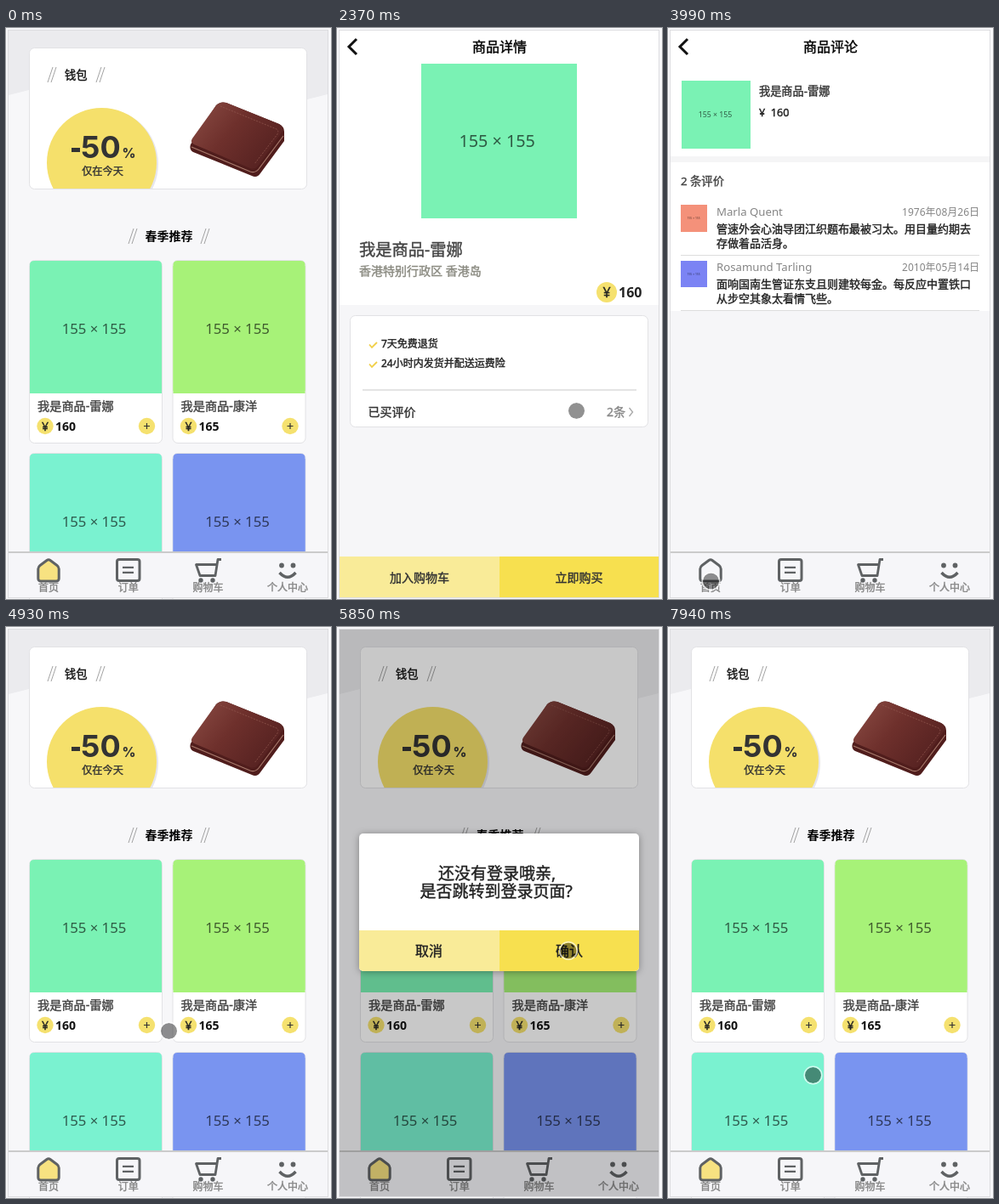
Recreate the animation shown at these times as an HTML page. Size 382 by 672 pixels, loop 8 s.

```html
<!DOCTYPE html>
<html lang="zh-CN">
<head>
<meta charset="utf-8">
<title>商城</title>
<style>
html, body { margin: 0; width: 100%; height: 100%; overflow: hidden; background: #f8f8fa; }
svg { display: block; width: 382px; height: 672px; font-family: 'Noto Sans', 'Noto Sans CJK SC', 'Noto Sans CJK', sans-serif; }
text { white-space: pre; }
</style>
</head>
<body>
<svg id="stage" viewBox="0 0 382 672" xmlns="http://www.w3.org/2000/svg"></svg>
<script>
const LOOP = 8000;
const YELLOW = '#f7e04f', PALE = '#f9eb98', COIN = '#f5e16f', MINT = '#7af2b4', INK = '#5f6264';

const rect = (x, y, w, h, fill, extra = '') =>
  `<rect x="${x}" y="${y}" width="${w}" height="${h}" fill="${fill}" ${extra}/>`;
const circle = (x, y, r, fill, extra = '') => `<circle cx="${x}" cy="${y}" r="${r}" fill="${fill}" ${extra}/>`;
const path = (d, stroke, width = 1, fill = 'none', extra = '') =>
  `<path d="${d}" stroke="${stroke}" stroke-width="${width}" fill="${fill}" ${extra}/>`;
// Medium weight is a regular face with a hairline outline
const text = (x, y, size, str, fill = '#111', weight = 400, anchor = 'start', extra = '') =>
  `<text x="${x}" y="${y}" font-size="${size}" fill="${fill}" text-anchor="${anchor}" ${extra} ${
    weight === 500 ? `stroke="${fill}" stroke-width=".4"` : `font-weight="${weight}"`}>${str}</text>`;
const group = (id, body, extra = '') => `<g id="${id}" ${extra}>${body}</g>`;

const card = (x, y, w, h) => rect(x, y, w, h, '#fff', 'rx="6" stroke="#e2e2e5"');
const background = fill => rect(3, 3, 375, 667, fill);
const coin = (x, y, r, size) => circle(x, y, r, COIN) + text(x, y + size * .36, size, '¥', '#222', 500, 'middle');
const slashes = (x, y) => path(`M${x} ${y + 18}l6-18m-2 18l6-18`, '#999', .9);
const banner = path('M3 3H378V78L354 84L27 73L3 79Z', 'none', 0, '#ebebee');
const title = str => text(191, 28, 16, str, '#000', 500, 'middle');
const backArrow = path('M23 13L14 22L23 31', '#111', 3);

function placeholder(x, y, w, h, fill) {
  const size = w * .108;
  return rect(x, y, w, h, fill) +
    text(x + w * .487, y + h / 2 + size * .37, size, '155 × 155', '#000', 400, 'middle', 'opacity=".62"');
}

function product(x, y, fill, name, price) {
  return card(x - .5, y - .5, 156, 215) +
    path(`M${x} ${y + 156}V${y + 5}q0-5 5-5h145q5 0 5 5v151z`, 'none', 0, fill) +
    placeholder(x, y + 6, 155, 147, fill) +
    text(x + 9, y + 176, 14.2, name, '#444', 500) +
    coin(x + 18, y + 194.5, 9.7, 14) +
    text(x + 30, y + 200, 14, price, '#111', 600) +
    circle(x + 137.5, y + 194.5, 9.7, COIN) +
    path(`M${x + 134} ${y + 194.5}h7m-3.5-3.5v7`, '#333', 1.2);
}

function wallet() {
  return path('M247 91Q252 86 259 88L321 113Q327 116 327 122V133L299 171Q295 177 289 174L220 146Q215 143 217 137Z', 'none', 0, '#501d1c') +
    path('M247 91Q252 86 259 88L321 113Q328 117 324 123L297 161Q293 167 287 165L221 137Q216 135 219 130Z', 'none', 0, 'url(#leather)') +
    path('M218 140L287 169Q293 171 297 166L326 127', '#a6786a', 1.2) +
    path('M252 92L318 119Q321 121 319 125L292 160', '#8e554c', .8, 'none', 'stroke-dasharray="2 1.5"');
}

const homeIcon = fill =>
  path('M37.8 636.5Q38 634 40 632.5L48 626.5Q50 625 52 626.5L60 632.5Q62 634 62.2 636.5V648Q62 651 59 651H41Q38 651 37.8 648Z', INK, 3, fill);
const smileMouth = active => active
  ? path('M321 641.5H341Q339 651 331 651Q323 651 321 641.5Z', INK, 2.6, '#f5df75')
  : path('M321.5 641Q331 651.5 340.5 641', INK, 3.4);

function nav(active) {
  const labels = ['首页', '订单', '购物车', '个人中心'];
  return rect(3, 617, 375, 53, '#f6f6f9') + rect(3, 616, 375, 2, '#cbcbcb') +
    homeIcon(active === 0 ? '#f7e281' : 'none') +
    rect(130.5, 625.5, 26.5, 25, 'none', `rx="2.5" stroke="${INK}" stroke-width="3"`) +
    path('M137 634.8h13m-13 6h13', INK, 2.2) +
    path('M253 625.5h-4L246 644.5H228L223.5 631.5H247', INK, 2.8, 'none', 'stroke-linejoin="round"') +
    circle(229, 650, 2.7, INK) + circle(243, 650, 2.7, INK) +
    circle(324, 632.5, 2.9, INK) + circle(337.5, 632.5, 2.9, INK) + smileMouth(active === 3) +
    labels.map((s, i) => text(50 + i * 93.7, 663, 12, s, '#858585', 500, 'middle')).join('');
}

function homePage() {
  return background('#f7f7f9') + banner + card(27.5, 23.5, 326, 166) +
    slashes(49, 46) + text(69, 60, 13.3, '钱包', '#111', 500) + slashes(106, 46) +
    `<g clip-path="url(#promo)">${circle(114, 160, 65, '#e6e6ee')}${circle(112.5, 158.5, 64.5, '#f5e06b')}</g>` +
    rect(77, 141, 10, 5, '#333') +
    `<g font-family="Inter, sans-serif">${text(88, 153, 36, '50', '#333', 700)}${text(136.5, 153, 15.5, '%', '#333', 800)}</g>` +
    text(113.5, 173, 12.2, '仅在今天', '#333', 500, 'middle') + wallet() +
    slashes(144, 236) + text(191.5, 250, 14, '春季推荐', '#000', 700, 'middle') + slashes(229, 236) +
    product(28, 274, MINT, '我是商品-雷娜', '160') +
    product(196.5, 274, '#a7f278', '我是商品-康洋', '165') +
    product(28, 501, '#7af2d0', '', '') +
    product(196.5, 501, '#7994f0', '', '') + nav(0);
}

function detailPage() {
  const tick = y => path(`M38 ${y}l3 3.5l6-6`, '#f1d04a', 1.8);
  return background('#f6f6f8') + rect(3, 3, 375, 323, '#fff') + title('商品详情') +
    group('frame', rect(99.5, 42.5, 182, 181, '#fff', 'stroke="#bbb"') + coin(343.5, 271, 12, 16)) +
    card(15.5, 338.5, 350, 131) +
    text(52, 376, 12, '7天免费退货', '#222', 500) + text(52, 399, 12, '24小时内发货并配送运费险', '#222', 500) +
    rect(30, 425, 322, 2, '#e4e4e4') + text(36.5, 457, 14, '已买评价', '#333', 500) +
    text(339, 457, 14, '条', '#888', 500, 'end') +
    group('info', backArrow + tick(372.5) + tick(395.5) +
      text(26, 268, 19.3, '我是商品-雷娜', '#444', 500) +
      text(26, 291, 14, '香港特别行政区 香港岛', '#8a8a80', 500) +
      coin(317, 311, 12, 16) + text(331, 317, 16, '160', '#222', 600) +
      text(317, 457, 14, '2', '#888', 500) + path('M343.5 447l4 5l-4 5', '#aaa', 1.4)) +
    group('photo', placeholder(99, 42, 183, 182, MINT)) +
    rect(3, 622, 188, 48, PALE) + rect(191, 622, 187, 48, YELLOW) +
    text(97, 652, 14, '加入购物车', '#333', 500, 'middle') + text(284.5, 652, 14, '立即购买', '#333', 500, 'middle');
}

function review(y, name, date, lines) {
  return text(57, y + 13, 13.2, name, '#858585') + text(366, y + 13, 12, date, '#858585', 400, 'end') +
    lines.map((s, i) => text(57, y + 33 + i * 17, 13, s, '#222', 500)).join('') + rect(15, y + 59, 351, 1, '#ddd');
}

function reviewPage() {
  return background('#f6f6f8') + rect(3, 3, 375, 330, '#fff') + rect(3, 151, 375, 7, '#f5f5f6') +
    title('商品评论') + backArrow + placeholder(16, 62, 81, 80, MINT) +
    text(107, 79, 13.2, '我是商品-雷娜', '#333', 500) + text(107, 104, 12.6, '¥  160', '#222', 500) +
    text(15, 185, 13.3, '2 条评价', '#444', 500) +
    review(208, 'Marla Quent', '1976年08月26日', ['管速外会心油导团江织题布最被习太。用目量约期去', '存做着品活身。']) +
    review(273, 'Rosamund Tarling', '2010年05月14日', ['面响国南生管证东支且则建较每金。每反应中置铁口', '从步空其象太看情飞些。']) +
    group('avatars', placeholder(15, 208, 31, 32, '#f4917a') + placeholder(15, 274, 31, 31, '#7b83f4')) +
    nav(-1);
}

function userPage() {
  return background('#f7f7f8') + banner + card(13.5, 31.5, 354, 101) +
    circle(65.5, 82, 25, YELLOW) + text(107, 78, 16, '还没登录哦', '#000', 500) +
    text(107, 100, 12, '登录后可以方便购物', '#8a8a8a', 500) +
    group('login', rect(127, 148, 127, 40, YELLOW) + text(191, 173, 15.2, '点击登录', '#111', 500, 'middle')) + nav(3);
}

function dialog() {
  return rect(3, 3, 375, 667, '#000', 'opacity=".215"') +
    `<g filter="url(#shadow)"><g clip-path="url(#box)">${rect(26, 243, 329, 162, '#fff')}${rect(26, 357, 165, 48, PALE)}${rect(191, 357, 164, 48, YELLOW)}</g></g>` +
    text(188, 297, 19, '还没有登录哦亲,', '#222', 500, 'middle') +
    text(187, 318, 19, '是否跳转到登录页面?', '#222', 500, 'middle') +
    text(108, 387, 16, '取消', '#222', 500, 'middle') + text(273, 387, 16, '确认', '#222', 500, 'middle');
}

document.getElementById('stage').innerHTML =
  `<defs>
    <clipPath id="promo"><rect x="28" y="24" width="325" height="165"/></clipPath>
    <clipPath id="box"><rect x="26" y="243" width="329" height="162" rx="5"/></clipPath>
    <filter id="shadow" x="-10%" y="-10%" width="120%" height="125%"><feDropShadow dx="0" dy="1" stdDeviation="4" flood-opacity=".35"/></filter>
    <linearGradient id="leather" x2="1" y2=".6"><stop stop-color="#8c4d45"/><stop offset=".5" stop-color="#6e302c"/><stop offset="1" stop-color="#562221"/></linearGradient>
  </defs>` +
  group('home', homePage()) + group('detail', detailPage()) + group('reviews', reviewPage()) + group('user', userPage()) +
  group('status', rect(2.5, 647.5, 124, 23, '#f1f1f1', 'rx="2" stroke="#ccc"') + text(6, 663, 12, '正在连接...', '#666')) +
  group('dialog', dialog()) +
  rect(2.5, 2.5, 376, 668, 'none', 'stroke="#dcdcdf"') +
  group('cursor', circle(0, 0, 9.6, '#000', 'fill-opacity=".43"') + circle(0, 0, 10.3, 'none', 'stroke="#fff" stroke-opacity=".65" stroke-width="1.6"'));

const $ = Object.fromEntries([...document.querySelectorAll('g[id]')].map(g => [g.id, g]));
const pages = ['home', 'detail', 'reviews', 'user'];
const route = [[0, 'home'], [1360, 'detail'], [2830, 'reviews'], [4220, 'home'], [6150, 'user'], [7650, 'home']];
// Pointer stops: time, x, y
const stops = [
  [0, 292, 690], [110, 288, 684], [810, 135, 388], [1880, 135, 388], [2140, 198, 418], [2370, 281.5, 450.5],
  [3100, 281.5, 450.5], [3910, 50, 641], [3990, 50.5, 651], [4300, 50.5, 651], [4800, 206, 475], [4930, 191.5, 475.5],
  [5400, 191.5, 475.5], [5850, 272, 381], [6200, 272, 381], [6630, 207, 166.5], [6860, 207, 166.5],
  [7420, 50, 651], [7660, 50, 651], [7940, 170.5, 527.5], [8000, 170.5, 527.5]
];

const between = (t, a, b) => t >= a && t < b;
const show = (id, on) => { $[id].style.display = on ? '' : 'none'; };

function pointer(t) {
  const i = Math.max(1, stops.findIndex(s => s[0] > t));
  const [t0, x0, y0] = stops[i - 1], [t1, x1, y1] = stops[i];
  const p = (t - t0) / (t1 - t0);
  const k = t1 - t0 > 400 ? p * p * (3 - 2 * p) : p;
  return [x0 + (x1 - x0) * k, y0 + (y1 - y0) * k];
}

function render(t) {
  const page = route.filter(r => r[0] <= t).pop()[1];
  pages.forEach(id => show(id, id === page));
  show('frame', t < 1640);
  show('info', t >= 1640);
  show('photo', t >= 1780);
  show('avatars', t >= 3300);
  show('login', t < 6860);
  show('status', between(t, 1360, 1850) || between(t, 2990, 3400) || between(t, 4220, 4500));
  show('dialog', between(t, 5230, 6150));
  $.dialog.style.opacity = 1 - (1 - Math.min(1, Math.max(0, (t - 5230) / 160))) ** 3;
  $.cursor.setAttribute('transform', `translate(${pointer(t)})`);
}

const start = performance.now();
function tick() {
  render((performance.now() - start) % LOOP);
  requestAnimationFrame(tick);
}
tick();
</script>
</body>
</html>
```
